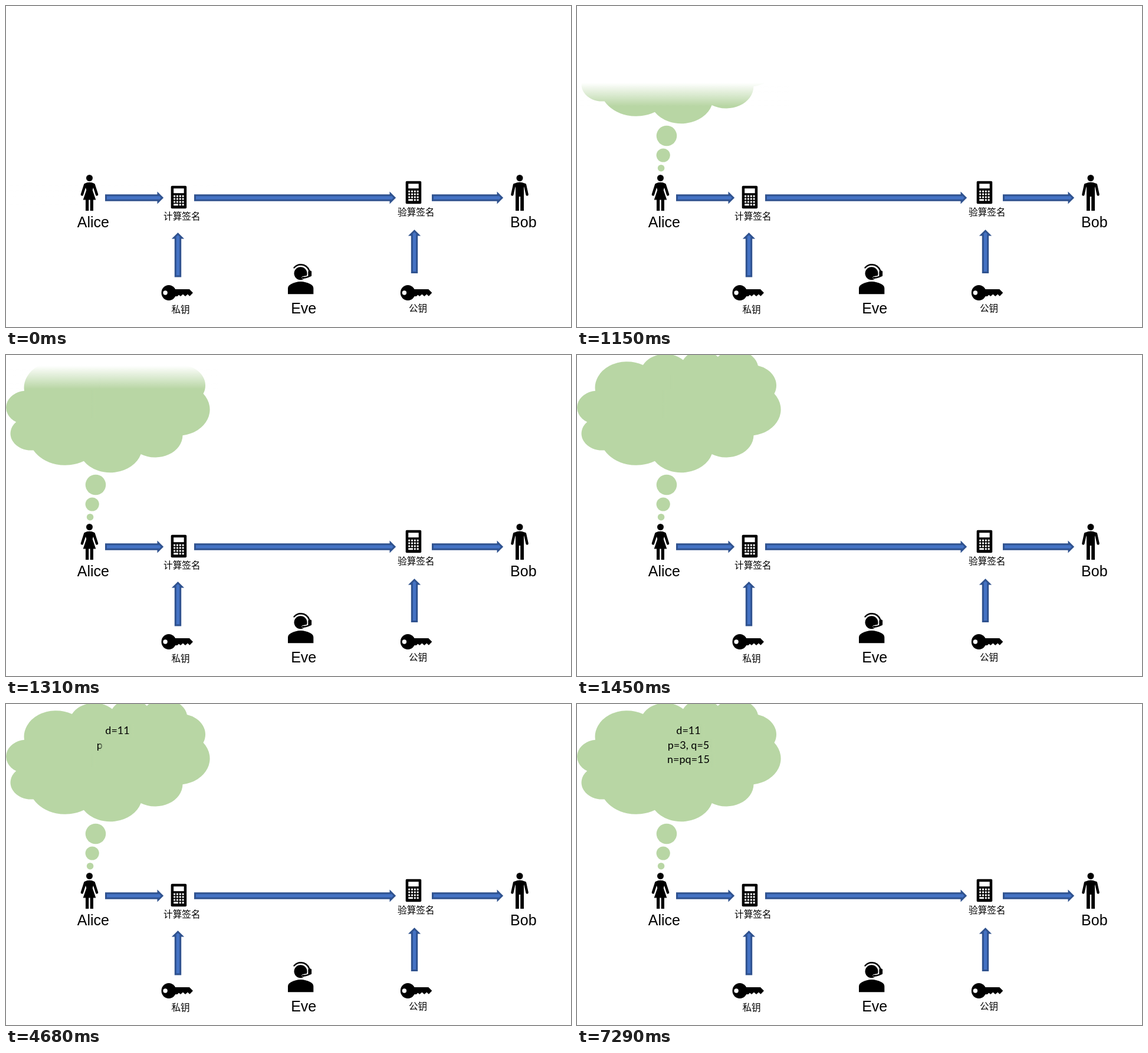
Recreate the animation shown at these times as an HTML page. Size 958 by 544 pixels, loop 8000 ms.

```html
<!DOCTYPE html>
<html lang="zh-CN">
<head>
<meta charset="utf-8">
<title>数字签名</title>
<style>
  html, body { margin: 0; width: 100%; height: 100%; overflow: hidden; background: #fff; }
  svg { display: block; width: 100%; height: 100%; }

  .cloud { fill: #b8d6a4; }
  .arrows { fill: #4472c4; stroke: #2f528f; stroke-width: 3; }
  text { text-anchor: middle; fill: #000; }
  .names { font: 25px "Liberation Sans", Arial, sans-serif; }
  .labels { font: 500 15.6px "Noto Sans CJK SC", "Noto Sans CJK", sans-serif; }
  .sums { font: 18px Lato, sans-serif; }

  /* Soft-edged covers slide away in steps to reveal what lies below. */
  .cover { animation: 8s infinite; }
  .over-cloud { animation-name: reveal-cloud; }
  .over-d { animation-name: reveal-d; }
  .over-pq { animation-name: reveal-pq; }
  .over-n { animation-name: reveal-n; }

  @keyframes reveal-cloud {
    0%, 12.23% { transform: translateY(298px); animation-timing-function: steps(7, jump-start); }
    19.08%, 100% { transform: translateY(-94px); }
  }
  @keyframes reveal-d {
    0%, 37.98% { transform: translateX(165px); animation-timing-function: steps(5, jump-start); }
    42.98%, 100% { transform: translateX(217px); }
  }
  @keyframes reveal-pq {
    0%, 58.48% { transform: translateX(152px); animation-timing-function: steps(6, jump-start); }
    64.48%, 100% { transform: translateX(234px); }
  }
  @keyframes reveal-n {
    0%, 86.98% { transform: translateX(152px); animation-timing-function: steps(5, jump-start); }
    92.14%, 100% { transform: translateX(235px); }
  }
</style>
</head>
<body>
<svg viewBox="0 0 958 544">
  <defs>
    <linearGradient id="fade-up" gradientUnits="userSpaceOnUse" x1="0" y1="0" x2="0" y2="40">
      <stop stop-color="#fff"/>
      <stop offset="1" stop-color="#fff" stop-opacity="0"/>
    </linearGradient>
    <linearGradient id="fade-right" gradientUnits="userSpaceOnUse" x1="-8" y1="0" x2="0" y2="0">
      <stop stop-color="#b8d6a4" stop-opacity="0"/>
      <stop offset="1" stop-color="#b8d6a4"/>
    </linearGradient>

    <g id="calculator">
      <rect width="26.5" height="38.5" rx="2"/>
      <path fill="#fff" d="M4.5 4.5h17.5v8H4.5z"/>
      <path stroke="#fff" stroke-width="3" stroke-dasharray="3 1.8" d="M4.5 17.6h17.5M4.5 22.4h17.5M4.5 27.2h17.5"/>
      <path stroke="#fff" stroke-width="3" stroke-dasharray="7.8 1.8 3 1.8" d="M4.5 32h17.5"/>
    </g>

    <g id="key">
      <ellipse cx="12.5" cy="13" rx="12.5" ry="13"/>
      <path d="M20 7H47.5L53.5 13 48 18.8 44.5 15.5 40.5 19 36.5 15.5 32.5 19 29.5 16.5 27 19H20z"/>
      <circle cx="6.6" cy="13" r="3.7" fill="#fff"/>
    </g>
  </defs>

  <g class="cloud">
    <path d="M31 60.8
      A54.2 44.1 0 0 1 111.9 17.1
      A42.8 34.9 0 0 1 180 8.4
      A35 28.5 0 0 1 238.8 3.2
      A39 31.7 0 0 1 306.9 18.1
      A42.8 34.9 0 0 1 334.5 65.6
      A54.4 44.3 0 0 1 299.5 136.2
      A46.5 37.8 0 0 1 228.7 168
      A54.2 44.2 0 0 1 131.9 179.8
      A62 50.6 0 0 1 46.6 161.4
      A35 28.4 0 0 1 17.2 113.6
      A34.9 28.5 0 0 1 31 60.8z"/>
    <circle cx="152" cy="220" r="17.3"/>
    <circle cx="146.2" cy="253" r="11.6"/>
    <circle cx="142.6" cy="274.7" r="5.8"/>
  </g>

  <g class="sums">
    <text x="189" y="51">d=11</text>
    <text x="189" y="75.5">p=3, q=5</text>
    <text x="189" y="100">n=pq=15</text>
  </g>
  <g fill="url(#fade-right)">
    <rect class="cover over-d" x="-8" y="34" width="88" height="23"/>
    <rect class="cover over-pq" x="-8" y="59" width="88" height="23"/>
    <rect class="cover over-n" x="-8" y="84" width="88" height="23"/>
  </g>
  <rect class="cover over-cloud" y="-400" width="360" height="440" fill="url(#fade-up)"/>

  <g class="arrows">
    <path transform="translate(169.5 325)" d="M0-4.2H88.5V-7l7 7-7 7V4.2H0z"/>
    <path transform="translate(320.5 325)" d="M0-4.2H331.5V-7l7 7-7 7V4.2H0z"/>
    <path transform="translate(723.5 325)" d="M0-4.2H110.5V-7l7 7-7 7V4.2H0z"/>
    <path transform="translate(291.5 458) rotate(-90)" d="M0-4.2H65V-7l7 7-7 7V4.2H0z"/>
    <path transform="translate(692.5 451.5) rotate(-90)" d="M0-4.2H63.5V-7l7 7-7 7V4.2H0z"/>
  </g>

  <!-- woman -->
  <g transform="translate(141.5 286)">
    <circle cy="5.5" r="5.5"/>
    <path d="M-8.5 15Q0 10.5 8.5 15L5.2 26 10.8 42.5H6.5V61H1.2V42.5H-1.2V61H-6.5V42.5H-10.8L-5.2 26z"/>
    <path stroke="#000" stroke-width="4.4" stroke-linecap="round" d="M-7.3 17L-12.6 33.5M7.3 17L12.6 33.5"/>
  </g>

  <!-- man -->
  <g transform="translate(871 286)">
    <circle cy="5.5" r="5.5"/>
    <path d="M-9.5 15Q0 10 9.5 15L7 22V61H1.2V37H-1.2V61H-7V22z"/>
    <path stroke="#000" stroke-width="4.4" stroke-linecap="round" d="M-9 17L-12.6 33.5M9 17L12.6 33.5"/>
  </g>

  <use href="#calculator" x="279.7" y="304.7"/>
  <use href="#calculator" x="677.7" y="296.7"/>
  <use href="#key" x="263.5" y="473"/>
  <use href="#key" x="668.8" y="473"/>

  <!-- listener with headset -->
  <path d="M478 488.3V478.5Q478 474 483 471.5 499.5 462.5 516.5 471.5 521.3 474 521.3 478.5V488.3z"/>
  <circle cx="499.5" cy="453.3" r="11"/>
  <g fill="none" stroke-linecap="round">
    <path stroke="#fff" stroke-width="5" d="M514.5 458Q511 460 504 460.5"/>
    <path stroke="#000" stroke-width="2.4" d="M488.5 443.5Q493 438.2 500 438.2 510.5 438.5 514.5 449M515.5 457Q512 460 504 460.7"/>
  </g>
  <rect x="512.3" y="448.5" width="5.8" height="10" rx="2"/>
  <circle cx="503.8" cy="460.6" r="1.9"/>

  <g class="names">
    <text x="147.8" y="375">Alice</text>
    <text x="877.3" y="375">Bob</text>
    <text x="504.7" y="521">Eve</text>
  </g>
  <g class="labels">
    <text x="298.3" y="362">计算签名</text>
    <text x="695.3" y="354.7">验算签名</text>
    <text x="296" y="519.7">私钥</text>
    <text x="698.5" y="518">公钥</text>
  </g>
</svg>
</body>
</html>
```
